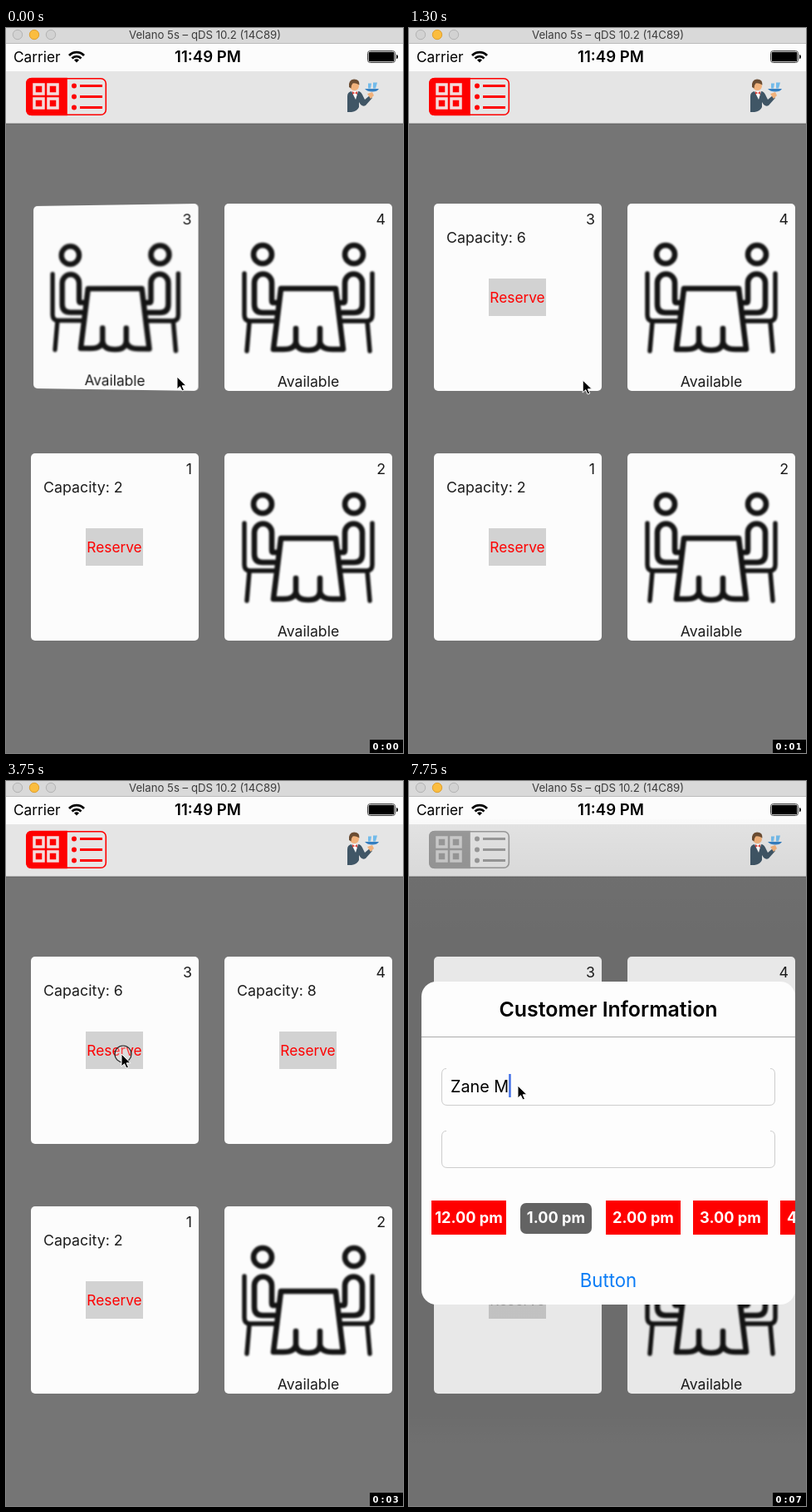
Animation, 478 px wide and 871 px high, one loop 8 s. Source, as an HTML page:

```html
<!DOCTYPE html>
<html lang="en">
<head>
<meta charset="utf-8">
<title>Table reservations</title>
<style>
html, body { margin: 0; width: 100%; height: 100%; overflow: hidden; background: #757575; }
svg { position: absolute; left: 0; top: 0; font-family: Inter, "Open Sans", sans-serif; }
#stage { position: relative; width: 478px; height: 871px; overflow: hidden; }
.slot { position: absolute; width: 202px; height: 225px; perspective: 700px; }
.card { background: #fcfcfc; border-radius: 5px; font-size: 17.8px; fill: #1c1c1c; }
.line { fill: none; stroke: #141414; stroke-width: 6.6; stroke-linejoin: round; stroke-linecap: round; filter: blur(1.1px); }
.bold { font-weight: 600; }
.mid { text-anchor: middle; }
.end { text-anchor: end; }
#typed { white-space: pre; }
</style>
</head>
<body>
<div id="stage">
  <svg width="478" height="871">
    <rect width="478" height="19" fill="#d9d9d9"/>
    <rect y="18" width="478" height="1" fill="#bcbcbc"/>
    <g fill="#d2d2d2" stroke="#b4b4b4">
      <circle cx="14" cy="8" r="5.7"/>
      <circle cx="34" cy="8" r="5.7" fill="#fbbd3f" stroke="#dfa02f"/>
      <circle cx="54" cy="8" r="5.7"/>
    </g>
    <text class="mid" x="239.5" y="13" font-size="13.2" fill="#3c3c3c">Velano 5s – qDS 10.2 (14C89)</text>

    <rect y="19" width="478" height="34" fill="#fcfcfc"/>
    <text x="9" y="41" font-size="17.300">Carrier</text>
    <text class="bold mid" x="243" y="41" font-size="18.600">11:49 PM</text>
    <g fill="none" stroke="#000" stroke-width="2.800">
      <path d="M76 33a12.500 12.500 0 0 1 18 0M79.500 36.500a7.500 7.500 0 0 1 11 0"/>
      <path d="M82 38.500a4 4 0 0 1 6 0l-3 3z" fill="#000" stroke="none"/>
      <rect x="435.500" y="27.500" width="33" height="14" rx="3" stroke="#444" stroke-width="1"/>
    </g>
    <rect x="436.700" y="28.700" width="30.600" height="11.600" rx="1.500"/>
    <path d="M470 32q2 0 2 2.500t-2 2.500z"/>

    <rect y="52" width="478" height="63" fill="#e5e5e5"/>
    <rect y="114.600" width="478" height="1" fill="#606060"/>
    <g fill="none" stroke="currentColor" stroke-width="1.600">
      <rect x="24.800" y="60.800" width="95.500" height="43.500" rx="6"/>
      <path d="M73 60.500H31q-6 0-6 6v32q0 6 6 6h42z" fill="currentColor"/>
      <path id="grid" d="M34 68h11v11h-11zm17 0h11v11h-11zM34 85h11v11h-11zm17 0h11v11h-11z" stroke-width="3.500"/>
      <path d="M89 69.500h27M89 82.500h27M89 95.500h27" stroke-width="3"/>
      <path d="M82 69.500h0M82 82.500h0M82 95.500h0" stroke-width="6" stroke-linecap="round"/>
    </g>
    <g>
      <path d="M411 101V82q0-5 5-6h8q3 0 5 4l3 6 6-5 3 3-8 9q-3 2-6-1l-2-3v6q-2 5-9 6z" fill="#405666"/>
      <path d="M416 76h8l-3 10z" fill="#fff"/>
      <path d="M417 76l6 4v-4l-6 4z" fill="#d6453d"/>
      <circle cx="419.500" cy="69.500" r="5.500" fill="#f1b27c"/>
      <path d="M413 71q-1-9 6-9.500 7 0 6.500 7-5-3-8-2-2 2-2 6z" fill="#6b4d33"/>
      <path d="M435 79l6-2 2 4-4 4z" fill="#f1b27c"/>
      <path d="M432 73h17q-2 3.500-8 3.500t-9-3.500z" fill="#367fc0"/>
      <path d="M436 66.500h4l-1 6h-3zm6-1h5l-2 7h-3z" fill="#73bbea"/>
    </g>
  </svg>

  <div id="cards"></div>

  <svg width="478" height="871">
    <linearGradient id="dim" gradientUnits="userSpaceOnUse" x1="0" x2="0" y1="46" y2="871">
      <stop offset="0" stop-opacity=".01"/>
      <stop offset=".083" stop-opacity=".055"/>
      <stop offset=".175" stop-opacity=".08"/>
      <stop offset=".865" stop-opacity=".08"/>
      <stop offset=".91" stop-opacity=".045"/>
    </linearGradient>
    <g id="modal">
      <rect y="46" width="478" height="825" fill="url(#dim)"/>
      <rect x="15" y="241" width="450" height="388" rx="18" fill="#fdfdfd"/>
      <rect x="15" y="307" width="450" height="1" fill="#acacac"/>
      <text class="bold mid" x="240" y="283" font-size="24.900">Customer Information</text>
      <g fill="none" stroke="#cdcdcd">
        <path id="field" d="M45 345.500q-5.500 0-5.500 6.500v31q0 6.500 6.500 6.500h388q6.500 0 6.500-6.500v-31q0-6.500-5.500-6.500"/>
        <use href="#field" y="75"/>
      </g>
      <text id="typed" x="50" y="374" font-size="19.800"></text>
      <rect id="caret" y="352" width="2.500" height="28" fill="#4270e6"/>
      <g id="chips" class="mid" font-size="18.200" font-weight="700"></g>
      <text class="mid" x="240" y="608" font-size="22.200" fill="#0a7cf6">Button</text>
    </g>
    <rect x="438" y="855" width="40" height="16"/>
    <text id="clock" x="441.500 451.500 457.500 465.800" y="866.500" font-size="10" fill="#fff"
      style="font-family:'DejaVu Sans',sans-serif;font-weight:bold"></text>
    <g id="cursor">
      <circle id="ring" cx="2" r="10" fill="#fff" fill-opacity=".25" stroke="#222" stroke-width="1.200"/>
      <path d="M0 0v15l3.500-3.300 2.500 5.300 2.500-1-2.400-5.200h5z" stroke="#fff"/>
    </g>
  </svg>
</div>
<script>
const $ = id => document.getElementById(id);
const clamp = v => Math.max(0, Math.min(1, v));
const smooth = v => (v = clamp(v)) * v * (3 - 2 * v);
const LOOP = 8000, FLIP = 980;

// Card flips to its back at flipAt; -Infinity means already flipped
const cards = [
  { x: 30, y: 211, number: 3, capacity: 6, flipAt: -100 },
  { x: 262.6, y: 211, number: 4, capacity: 8, flipAt: 2160 },
  { x: 30, y: 511, number: 1, capacity: 2, flipAt: -Infinity },
  { x: 262.6, y: 511, number: 2, capacity: 4, flipAt: Infinity }
];
const cursorPath = [
  [0, 206, 419], [720, 195, 425], [1000, 198, 425], [1300, 209, 423], [1780, 312, 424],
  [2130, 312, 424], [2480, 282, 420], [3510, 139, 328], [4110, 139, 328], [4470, 131, 366], [LOOP, 131, 366]
];
const clicks = [2020, 3750, 4710];
const ticks = [960, 2020, 3100, 4230, 5190, 6230, 7400];
const guest = "Zane M", keyTimes = [6110, 6470, 6590, 6820, 7400, 7750];

const diner = `<circle cx="46" cy="61" r="11"/>
  <path d="M63 119h-4q-2 0-2-3V95a10.500 10.500 0 0 0-21 0v26q0 10 10 10h14"/>
  <path d="M24 84v50q0 7 7 7h29M30 142l-3 35" stroke-width="5.500"/>`;
const front = `<g class="line">${diner}<g transform="matrix(-1 0 0 1 202 0)">${diner}</g>
  <path d="M68 102h66l9 73h-13q-14 0-15-9v-16 16q-1 10-13 10h-2q-13 0-14-10v-16 16q-1 9-15 9h-12z"/></g>
  <text class="mid" x="101" y="220" font-size="17.600">Available</text>`;
const back = capacity => `<text x="15" y="47">Capacity: ${capacity}</text>
  <rect x="66" y="90" width="69" height="45" fill="#d2d2d2"/>
  <text class="mid" x="100.500" y="119" font-size="17.300" fill="currentColor">Reserve</text>`;

$("cards").innerHTML = cards.map(c => `<div class="slot" style="left:${c.x}px;top:${c.y}px">
  <svg class="card" width="202" height="225"><g>${front}</g><g>${back(c.capacity)}</g>
  <text class="end" x="194" y="25">${c.number}</text></svg></div>`).join("");
document.querySelectorAll(".card").forEach((el, i) => cards[i].el = el);

const chip = (x, label) => `<rect x="${x}" y="504" width="90" height="41" fill="#fe0000"/>
  <text x="${x + 45}" y="531" fill="#fff">${label}</text>`;
$("chips").innerHTML = chip(27, "12.00 pm") + chip(237, "2.00 pm") + chip(342, "3.00 pm") +
  `<rect x="134" y="507" width="86" height="37" rx="7" fill="#636363"/>
  <text x="177" y="531" fill="#fff">1.00 pm</text>
  <svg x="447" y="504" width="18" height="41" viewBox="447 504 18 41">${chip(447, "4.00 pm")}</svg>`;

function drawCard({ el, flipAt }, t) {
  const turn = smooth((t - flipAt) / FLIP), flipped = turn > 0.5;
  const angle = Math.PI * (flipped ? 1 - turn : turn), sin = Math.sin(angle);
  const shade = flipped ? 1.16 * (1 - turn) : 0.67 * sin * sin;
  const moving = angle > 0.001;
  el.children[0].style.display = flipped ? "none" : "";
  el.children[1].style.display = flipped ? "" : "none";
  el.style.transform = moving ? `translateZ(${-101 * sin}px) rotateY(${flipped ? angle : -angle}rad)` : "none";
  el.style.filter = moving ? `brightness(${1 - shade})` : "none";
}

function drawCursor(t) {
  const i = cursorPath.findIndex(p => p[0] > t);
  const [t0, x0, y0] = cursorPath[i - 1], [t1, x1, y1] = cursorPath[i];
  const k = (t - t0) / (t1 - t0);
  $("cursor").setAttribute("transform", `translate(${x0 + (x1 - x0) * k} ${y0 + (y1 - y0) * k})`);
  $("ring").style.display = clicks.some(c => t >= c && t < c + 115) ? "" : "none";
}

function draw(now) {
  const t = now % LOOP;
  cards.forEach(c => drawCard(c, t));
  drawCursor(t);

  const shown = clamp((t - 3770) / 200);
  const blend = (from, to) => `rgb(${from.map(v => Math.round(v + (to - v) * shown))})`;
  $("modal").style.opacity = shown;
  $("stage").style.color = blend([254, 0, 0], 154);
  $("grid").style.stroke = blend([243, 220, 220], 205);

  $("typed").textContent = guest.slice(0, keyTimes.filter(k => k <= t).length);
  $("caret").setAttribute("x", 50 + $("typed").getComputedTextLength());
  $("caret").style.opacity = t < 4830 ? 0 : t < 5890 ? 1 - clamp((t - 5390) / 270) : 1;

  $("clock").textContent = "0:0" + ticks.filter(k => k <= t).length;
  requestAnimationFrame(draw);
}
requestAnimationFrame(draw);
</script>
</body>
</html>
```
